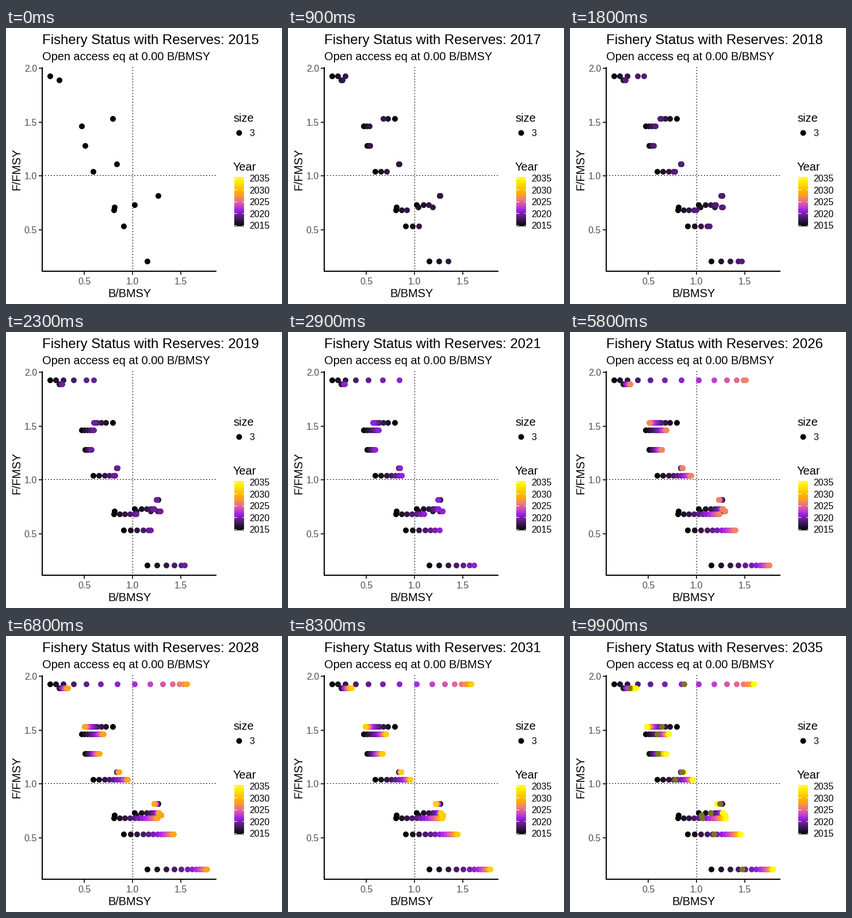
Write a matplotlib script that moves like this. It is 480 px wide and 480 px high and loops after 10000 ms.

```python
import numpy as np
import matplotlib.pyplot as plt
from matplotlib.animation import FuncAnimation

plt.rcParams["font.family"] = ["Liberation Sans", "DejaVu Sans"]
plt.rcParams["toolbar"] = "None"

SIZE = 480
N_FRAMES = 100
N_YEARS = 21
LEFT, RIGHT, TOP, BOTTOM = 63, 366, 68, 423

# Stocks by growth rate: F/FMSY, first B/BMSY, share of fishing a reserve stops
STOCKS = {
    0.09: [(1.88, 0.244, 0.36), (1.105, 0.839, 0), (0.81, 1.268, 0)],
    0.28: [(1.275, 0.512, 0), (0.68, 0.81, 0), (0.53, 0.911, 0),
           (0.205, 1.155, 0)],
    0.55: [(1.92, 0.149, 0.79), (1.525, 0.798, 0), (1.455, 0.476, 0.12),
           (1.035, 0.595, 0), (0.725, 1.024, 0)],
    1.15: [(0.705, 0.815, 0)],
}

# Frames on which a new year begins: every 5, then every 4 for the last three
STARTS = [*range(4, 85, 5), *range(88, 97, 4)]

# Linear sRGB to XYZ, scaled to the D65 white point
TO_XYZ = np.array([[0.4124, 0.3576, 0.1805],
                   [0.2126, 0.7152, 0.0722],
                   [0.0193, 0.1192, 0.9505]])
TO_XYZ /= TO_XYZ.sum(axis=1, keepdims=True)
TO_RGB = np.linalg.inv(TO_XYZ)


def x_px(b):
    return 52 + 168 * np.asarray(b)


def y_px(f):
    return 256.5 - 187.8 * (np.asarray(f) - 1)


def rgb_to_lab(rgb):
    rgb = np.asarray(rgb, float)
    lin = np.where(rgb > 0.04045, ((rgb + 0.055) / 1.055) ** 2.4, rgb / 12.92)
    xyz = lin @ TO_XYZ.T
    f = np.where(xyz > 0.008856, np.cbrt(xyz), 7.787 * xyz + 16 / 116)
    x, y, z = np.moveaxis(f, -1, 0)
    return np.stack([116 * y - 16, 500 * (x - y), 200 * (y - z)], axis=-1)


def lab_to_rgb(lab):
    light, a, b = np.moveaxis(np.asarray(lab, float), -1, 0)
    y = (light + 16) / 116
    f = np.stack([y + a / 500, y, y - b / 200], axis=-1)
    xyz = np.where(f > 0.2069, f ** 3, (f - 16 / 116) / 7.787)
    lin = np.clip(xyz @ TO_RGB.T, 0, 1)
    rgb = np.where(lin > 0.0031308, 1.055 * lin ** (1 / 2.4) - 0.055,
                   12.92 * lin)
    return np.clip(rgb, 0, 1)


STOPS = rgb_to_lab(np.array([(0, 0, 0), (160, 32, 240),
                             (255, 165, 0), (255, 255, 0)]) / 255)


def ramp_lab(t):
    """Black - purple - orange - yellow, blended in Lab."""
    at = np.linspace(0, 1, len(STOPS))
    return np.stack([np.interp(t, at, STOPS[:, i]) for i in range(3)], axis=-1)


def fish():
    """Schaefer model with constant effort: one row of B/BMSY per year."""
    stocks = np.array([(g, *s) for g, group in STOCKS.items() for s in group])
    growth, effort, b, spared = stocks.T
    felt = effort * (1 - spared)
    years = [b]
    for _ in range(N_YEARS - 1):
        b = b + growth * b * (1 - b / 2 - felt / 2)
        years.append(b)
    return np.array(years), effort


biomass, effort = fish()
xs, ys = x_px(biomass), np.round(y_px(effort))
year_lab = ramp_lab(np.linspace(0, 1, N_YEARS))

fig = plt.figure(figsize=(SIZE / 72, SIZE / 72), dpi=72, facecolor="white")
ax = fig.add_axes([0, 0, 1, 1])
ax.axis("off")


def label(x, y, text, size, color="black", **kw):
    return ax.text(x, y, text, fontsize=size, color=color,
                   va="baseline", **kw)


def line(x0, y0, x1, y1, width=2, color="black", **kw):
    ax.plot([x0, x1], [y0, y1], color=color, lw=width,
            solid_capstyle="butt", dash_capstyle="butt",
            antialiased=False, **kw)


def dots(x, y, zorder):
    return ax.scatter(x, y, s=100, c="black", linewidths=0, zorder=zorder)


# Titles
title = label(63, 28, "", 24)
label(63, 56, "Open access eq at 0.00 B/BMSY", 20)
label(215, 468, "B/BMSY", 20, ha="center")
label(24, 245, "F/FMSY", 20, ha="center", rotation=90,
      rotation_mode="anchor")

# Reference lines at 1.0; the half-pixel offset keeps each dot one pixel long
dotted = dict(width=1, linestyle=(0.5, (1, 3)), zorder=1)
line(220, TOP, 220, BOTTOM, **dotted)
line(LEFT, 256, RIGHT, 256, **dotted)

# Axes
line(LEFT, TOP, LEFT, BOTTOM + 1)
line(LEFT - 1, BOTTOM, RIGHT, BOTTOM)
for v in (0.5, 1.0, 1.5, 2.0):
    if v < 2:
        x = round(float(x_px(v)))
        line(x, BOTTOM + 1, x, BOTTOM + 6, color="#333333")
        label(x, 446, f"{v:.1f}", 16, "#4d4d4d", ha="center")
    y = round(float(y_px(v))) + 1
    line(LEFT - 6, y, LEFT - 1, y, color="#333333")
    label(54, y + 6, f"{v:.1f}", 16, "#4d4d4d", ha="right")

# Size legend
label(395, 163, "size", 20)
dots([405], [182], 3)
label(423, 188, "3", 16)

# Colour bar
label(395, 248, "Year", 20)
BAR_TOP, BAR_LOW = 261.2, 343.4
rows = np.arange(259, 345) + 0.5
shade = np.clip((BAR_LOW - rows) / (BAR_LOW - BAR_TOP), 0, 1)
ax.imshow(lab_to_rgb(ramp_lab(shade))[:, None, :], aspect="auto",
          extent=(397, 414, 345, 259), interpolation="nearest", zorder=2)
for i, y in enumerate(np.linspace(BAR_LOW, BAR_TOP, 5)):
    for x in (397, 410.5):
        line(x, int(y), x + 3.5, int(y), width=1, color="white", zorder=3)
    label(423, y + 6, str(2015 + 5 * i), 16)

points = dots([], [], 4)
ax.set_xlim(0, SIZE)
ax.set_ylim(SIZE, 0)


def draw(frame):
    now = sum(s <= frame for s in STARTS)
    px = xs[:now + 1]
    lab = year_lab[:now + 1]
    # One half-way frame between years, on top of the trail
    if frame + 1 in STARTS or frame == N_FRAMES - 1:
        after = (now + 1) % N_YEARS
        px = np.vstack([px, (xs[now] + xs[after]) / 2])
        lab = np.vstack([lab, (year_lab[now] + year_lab[after]) / 2])
    points.set_offsets(np.column_stack([np.round(px.ravel()),
                                        np.tile(ys, len(px))]))
    points.set_facecolor(np.repeat(lab_to_rgb(lab), len(ys), axis=0))
    title.set_text(f"Fishery Status with Reserves: {2015 + now}")
    return points, title


anim = FuncAnimation(fig, draw, frames=N_FRAMES, interval=100,
                     repeat=True, repeat_delay=0, blit=False)
plt.show()
```
